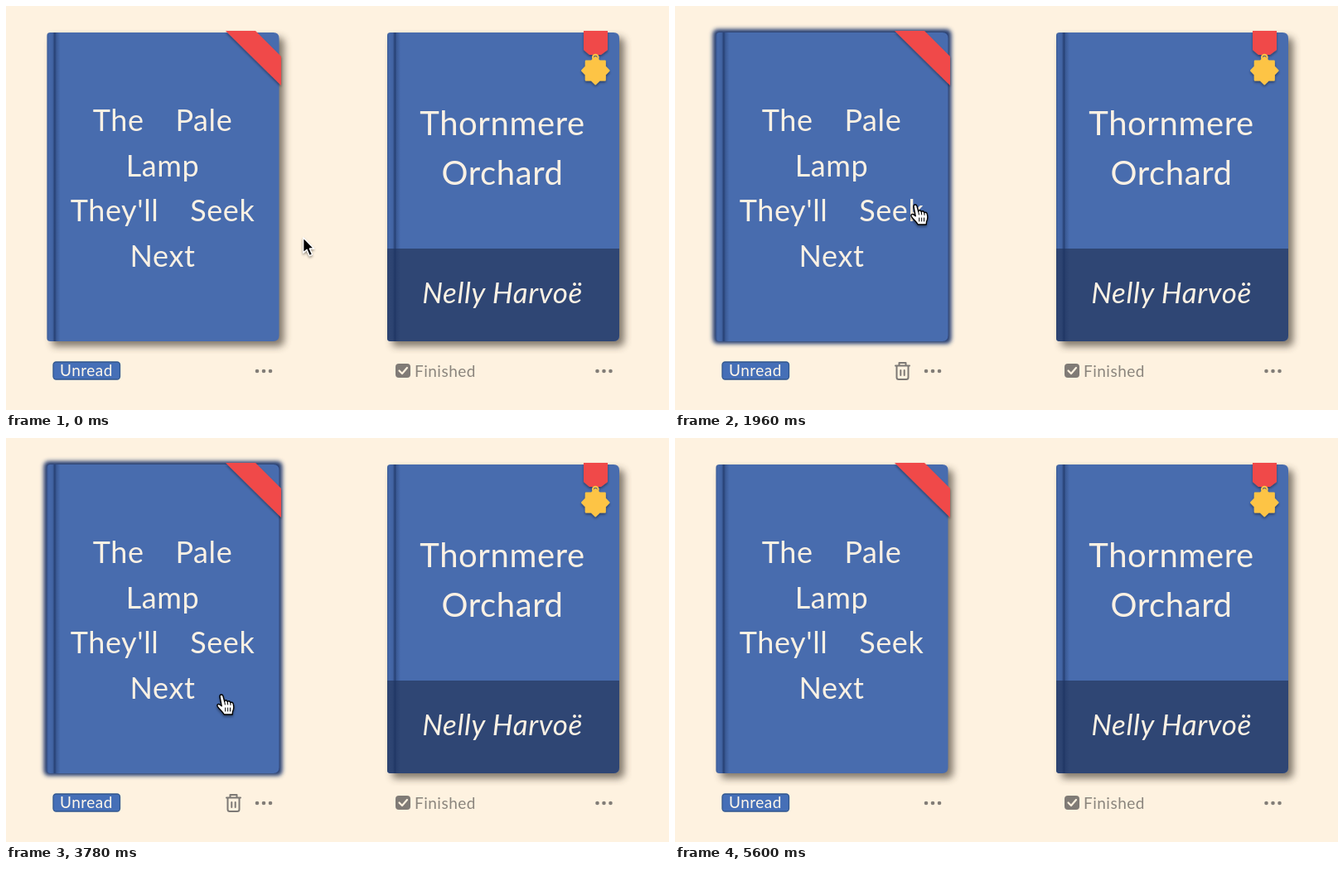
These frames come from a looping animation (800 by 488 pixels, 5.67 s). An HTML page:

```html
<!DOCTYPE html>
<html lang="en">
<head>
<meta charset="utf-8">
<style>
html, body { margin: 0; width: 100%; height: 100%; overflow: hidden; background: #fef2e0; }
svg { display: block; width: 800px; height: 488px; font-family: Lato, "Open Sans", sans-serif; }
.title { fill: #fbf1e4; text-anchor: middle; letter-spacing: .6px; }
.label { font-size: 19px; letter-spacing: .5px; }
</style>
</head>
<body>
<svg viewBox="0 0 800 488">
  <defs>
    <filter id="blur" x="-20%" y="-20%" width="140%" height="140%"><feGaussianBlur stdDeviation="5"/></filter>
    <filter id="soft" x="-20%" y="-20%" width="140%" height="140%"><feGaussianBlur stdDeviation="2.6"/></filter>
    <filter id="drop" x="-30%" y="-30%" width="160%" height="160%"><feDropShadow dx="0" dy="2" stdDeviation="1.5" flood-opacity=".4"/></filter>
    <linearGradient id="spine">
      <stop offset="0" stop-color="#1c3260" stop-opacity=".3"/>
      <stop offset=".15" stop-color="#1c3260" stop-opacity=".05"/>
      <stop offset=".42" stop-color="#1c3260" stop-opacity=".15"/>
      <stop offset=".58" stop-color="#1c3260" stop-opacity=".75"/>
      <stop offset=".72" stop-color="#1c3260" stop-opacity=".3"/>
      <stop offset="1" stop-color="#1c3260" stop-opacity="0"/>
    </linearGradient>
    <path id="cover" d="M4 0H273Q280 0 280 7V366Q280 373 273 373H4Q0 373 0 369V4Q0 0 4 0Z"/>
    <use id="shade" href="#cover" x="6" y="6" fill="#3d3429" opacity=".65" filter="url(#blur)"/>
    <rect id="crease" width="16" height="373" rx="3" fill="url(#spine)"/>
    <g id="dots" fill="#827d77"><circle r="2.3"/><circle cx="8" r="2.3"/><circle cx="16" r="2.3"/></g>
  </defs>

  <g transform="translate(49.5 32)">
    <use id="shadow" href="#shade"/>
    <rect id="glow" x="-4" y="-4" width="288" height="380" rx="6" fill="#223b70" filter="url(#soft)"/>
    <use href="#cover" fill="#486cae"/>
    <use href="#crease"/>
  </g>
  <path d="M265 30H301L332 61V96Z" fill="#f04a49" filter="url(#drop)"/>
  <g class="title" font-size="36">
    <g word-spacing="28"><text x="189" y="151">The Pale</text><text x="189" y="260">They'll Seek</text></g>
    <text x="189" y="206">Lamp</text><text x="189" y="315">Next</text>
  </g>
  <rect x="57" y="430" width="80.5" height="21" rx="3.5" fill="#456fb7" stroke="#30578f" stroke-width="1.3"/>
  <text class="label" x="65" y="447" fill="#fff7ea">Unread</text>
  <use href="#dots" x="303" y="441"/>
  <g id="trash" fill="none" stroke="#7d7975" stroke-width="2" stroke-linecap="round" stroke-linejoin="round">
    <path d="M266 434.5H283M270.5 434V431H278.5V434M267.5 435V448.5Q267.5 451 270 451H279Q281.5 451 281.5 448.5V435M272.3 440V446M276.7 440V446"/>
  </g>

  <g transform="translate(460 32)">
    <use href="#shade"/>
    <use href="#cover" fill="#486cae"/>
    <path d="M0 261H280V366Q280 373 273 373H4Q0 373 0 369Z" fill="#2f4674"/>
    <use href="#crease"/>
  </g>
  <g filter="url(#drop)">
    <path d="M697 30H726V53L718 59H704L697 53Z" fill="#f04a49"/>
    <circle cx="711.3" cy="62" r="3.3" fill="none" stroke="#fdc445" stroke-width="2"/>
    <path id="medal" fill="#fdc445" stroke="#fdc445" stroke-width="2" stroke-linejoin="round"/>
  </g>
  <g class="title" font-size="40">
    <text x="599" y="156">Thornmere</text><text x="599" y="216">Orchard</text>
    <text x="599" y="359" font-size="35" font-style="italic">Nelly Harvoë</text>
  </g>
  <rect x="470" y="432" width="18" height="17" rx="4" fill="#807b76"/>
  <path d="M474.5 440.5L478 444L484 437" fill="none" stroke="#fef2e0" stroke-width="2.2" stroke-linecap="round" stroke-linejoin="round"/>
  <text class="label" x="493" y="447.5" fill="#8b857d">Finished</text>
  <use href="#dots" x="713.5" y="441"/>

  <g id="cursor" filter="url(#drop)" stroke-linejoin="round">
    <path id="arrow" d="M.7 .7V19L5 15.2L8.2 22.5L11.4 21.1L8.3 14H13.6Z" fill="#000" stroke="#fff" stroke-width="1.3"/>
    <g id="hand" fill="#fff" stroke="#000" stroke-width="1.4" stroke-linecap="round">
      <path d="M-2 2.5C-2.5 -.5 1.3 -1 2 1.8L3.7 8.2C4 6.3 6.7 6.2 7.3 8.8C7.8 7.2 10.3 7.4 10.8 9.8C11.5 8.6 13.8 9 14.3 11.5C15.3 15.5 15.2 17.5 13.5 20.5L13.2 24H3.2C1.5 20.5 -2.5 18 -4.7 14.3C-6 11.8 -3.3 10.6 -1.5 12.4L.2 13.8Z"/>
      <path d="M3.7 8.2L4.3 12M7.3 8.8L7.7 12M10.8 9.8L11 12.5M4.7 16V20M7.7 16V20M10.5 16V20" stroke-width="1"/>
    </g>
  </g>
</svg>
<script>
const LOOP = 5670, STEP = 70;
const $ = id => document.getElementById(id);
const clamp = v => Math.min(1, Math.max(0, v));

// Pointer tip: time, x, y
const path = [
  [0, 358, 279], [140, 295, 272], [350, 238, 262], [490, 285, 254], [630, 345, 250], [770, 388, 248],
  [910, 390, 247], [1050, 390, 247], [1190, 320, 245], [1400, 243, 243], [1680, 232, 243],
  [1960, 290, 240], [2170, 350, 237], [2380, 386, 235], [2520, 387, 235], [2940, 388, 233],
  [3360, 380, 231], [3570, 295, 255], [3780, 260, 310], [3990, 262, 390], [4200, 270, 437],
  [4340, 271, 437], [4450, 270, 439], [4640, 262, 510], [5670, 262, 510]
];
const cardHover = [[100, 600], [1140, 2100], [3470, 4600]];
const bookHover = [[100, 600], [1140, 2100], [3470, 4020]];
const handTimes = [...bookHover, [4160, 4570]];

const slope = (i, k) => {
  const a = path[Math.max(0, i - 1)], b = path[Math.min(path.length - 1, i + 1)];
  const still = i && path[i + 1] && (path[i][k] - a[k]) * (b[k] - path[i][k]) <= 0;
  return still ? 0 : (b[k] - a[k]) / (b[0] - a[0]);
};

function pointer(t) {
  let i = 0;
  while (path[i + 1][0] <= t) i++;
  const p = path[i], q = path[i + 1], d = q[0] - p[0], u = (t - p[0]) / d;
  const ease = u * u * (3 - 2 * u);
  return [1, 2].map(k => p[k] + (q[k] - p[k]) * ease
    + d * u * (1 - u) * ((1 - u) * slope(i, k) - u * slope(i + 1, k)));
}

const fade = (spans, t, d) => Math.max(...spans.map(([a, b]) => clamp((t - a) / d) * (1 - clamp((t - b) / d))));

$("medal").setAttribute("d", "M" + Array.from({ length: 16 }, (_, i) => {
  const a = i * Math.PI / 8, r = i % 2 ? 12.6 : 16.2;
  return (711.3 + r * Math.sin(a)).toFixed(1) + " " + (78 - r * Math.cos(a)).toFixed(1);
}).join("L") + "Z");

function draw(now) {
  const t = Math.floor(now % LOOP / STEP) * STEP;
  const glow = fade(bookHover, t, 150);
  const hand = handTimes.some(([a, b]) => t >= a && t < b);
  $("glow").style.opacity = glow;
  $("shadow").style.opacity = 1 - glow;
  $("trash").style.opacity = fade(cardHover, t, 300);
  $("arrow").style.display = hand ? "none" : "";
  $("hand").style.display = hand ? "" : "none";
  $("cursor").setAttribute("transform", `translate(${pointer(t)})`);
}

const start = performance.now();
function tick() {
  draw(performance.now() - start);
  requestAnimationFrame(tick);
}
tick();
</script>
</body>
</html>
```
